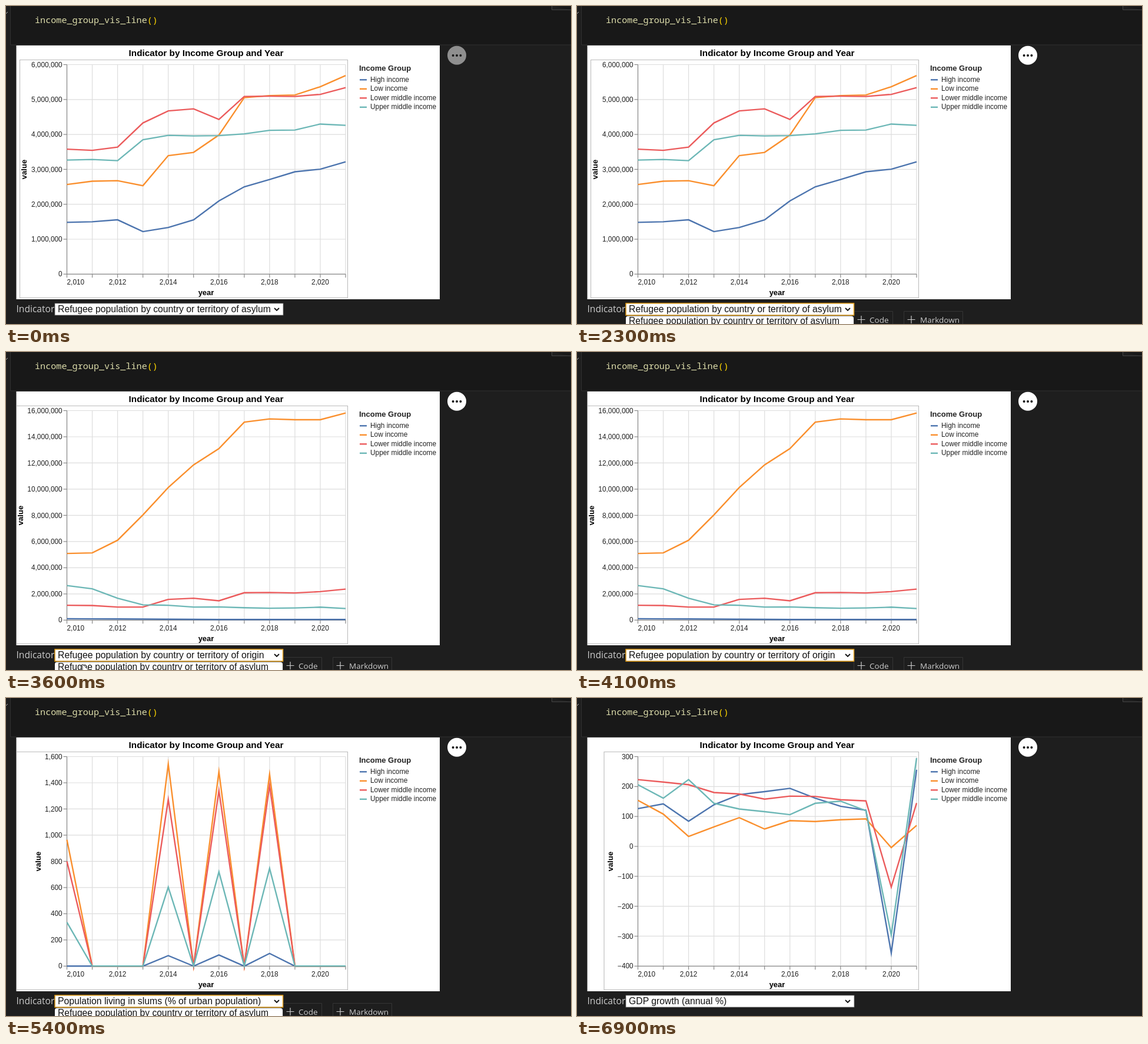
Write an HTML page that moves like this. It is 960 by 540 pixels and loops after 7 s.

```html
<!DOCTYPE html>
<html lang="en">
<head>
<meta charset="utf-8">
<title>Income group line chart</title>
<style>
html, body { margin: 0; width: 100%; height: 100%; overflow: hidden; background: #1e1e1e; }
svg { display: block; width: 960px; height: 540px; }
text { font-family: "Liberation Sans", Arial, sans-serif; font-size: 11.86px; fill: #222; white-space: pre; }
.bold { font-weight: 700; font-size: 13px; fill: #000; }
.title { font-size: 15.33px; }
.code { font: 500 15.15px "Noto Sans Mono", "DejaVu Sans Mono", monospace; fill: #dcdcaa; }
.ui { font-family: "Open Sans", "Noto Sans", sans-serif; font-size: 13.5px; fill: #ccc; }
.label { font-size: 15.6px; }
.choice { font-size: 15.78px; fill: #111; }
.grid { stroke: #ddd; stroke-width: 1.2; }
.axis { stroke: #888; stroke-width: 1.2; }
.frame { stroke: #bbb; stroke-width: 1.1; fill: none; }
.series { fill: none; stroke-width: 2.4; stroke-miterlimit: 10; }

.step { opacity: 0; animation: 7s step-end infinite; }
#asylum { animation-name: asylum; }
#origin { animation-name: origin; }
#slums { animation-name: slums; }
#growth { animation-name: growth; }
#focus { animation-name: focus; }
#list { animation-name: list; }
#buttons { animation: buttons 7s linear infinite; }
#menu { animation: menu 7s linear infinite; }
#cursor { animation: cursor 7s linear infinite; }

@keyframes asylum { 0% { opacity: 1 } 34.28%, 100% { opacity: 0 } }
@keyframes origin { 0% { opacity: 0 } 34.28% { opacity: 1 } 59.99%, 100% { opacity: 0 } }
@keyframes slums { 0% { opacity: 0 } 59.99% { opacity: 1 } 81.42%, 100% { opacity: 0 } }
@keyframes growth { 0% { opacity: 0 } 81.42%, 100% { opacity: 1 } }
@keyframes focus { 0% { opacity: 0 } 28.56% { opacity: 1 } 98.56%, 100% { opacity: 0 } }
@keyframes list {
  0%, 34.28%, 58.56%, 79.99%, 100% { opacity: 0 }
  28.56%, 49.99%, 74.28% { opacity: 1 }
}
@keyframes buttons { 0%, 7.14% { opacity: 0 } 11.42%, 79.9% { opacity: 1 } 84%, 100% { opacity: 0 } }
@keyframes menu { 0% { opacity: .5 } 2.85%, 100% { opacity: 1 } }
@keyframes cursor {
  0%, 20.8% { transform: translate(125px, 545px) }
  21.42% { transform: translate(125px, 531px) }
  22.85%, 24.5% { transform: translate(125px, 528px) }
  27.14%, 28.57% { transform: translate(130px, 515px) }
  31.4%, 45% { transform: translate(129px, 545px) }
  45.71% { transform: translate(129px, 533px) }
  48.57%, 50% { transform: translate(130px, 516px) }
  53%, 69.3% { transform: translate(130px, 545px) }
  70% { transform: translate(130px, 531px) }
  72.86%, 74.3% { transform: translate(130px, 516px) }
  77.1%, 100% { transform: translate(130px, 545px) }
}
</style>
</head>
<body>
<svg viewBox="0 0 960 540">
  <path d="M7.5 0H960V66H7.5Z" fill="#181818"/>
  <path d="M7.5 0V66H960" fill="none" stroke="#303030"/>
  <path d="M0 13L3 10" stroke="#aaa" fill="none"/>
  <path d="M927.5 0V6.5H960" fill="#1f1f1f" stroke="#444"/>
  <text class="code" x="49" y="29">income_group_vis_line<tspan fill="#ffd700">()</tspan></text>

  <rect x="17.5" y="67" width="719.5" height="431" fill="#fff"/>
  <text class="bold title" x="340" y="85" text-anchor="middle">Indicator by Income Group and Year</text>
  <g id="legend"><text class="bold" x="600" y="109.5" style="fill:#222">Income Group</text></g>

  <g id="menu">
    <circle cx="766" cy="83.7" r="16" fill="#fff"/>
    <g fill="#111"><circle cx="759.6" cy="84" r="2"/><circle cx="766" cy="84" r="2"/><circle cx="772.4" cy="84" r="2"/></g>
  </g>

  <g id="buttons">
    <path d="M470.500 540V518.500H536.500V540M555.500 540V518.500H655.500V540" fill="none" stroke="#353535"/>
    <path d="M476.500 532.500H489.500M483 526V539M561.500 532.500H574.500M568 526V539" stroke="#ccc" stroke-width="1.2"/>
    <text class="ui" x="497" y="538">Code</text>
    <text class="ui" x="583" y="538">Markdown</text>
  </g>

  <text class="ui label" x="17.5" y="520">Indicator</text>
  <rect x="83" y="505" width="388" height="20" fill="#fff" stroke="#767676" stroke-width=".8"/>
  <rect id="focus" class="step" x="83" y="504.700" width="387.500" height="20.500" fill="none" stroke="#e59700" stroke-width="1.3"/>
  <path d="M456 513L460 517L464 513" fill="none" stroke="#111" stroke-width="1.9"/>

  <g id="charts"></g>

  <g id="list" class="step">
    <rect x="83" y="526.500" width="387" height="30" rx="4" fill="#fff"/>
    <text class="choice" x="88" y="539.500" style="font-size:15.6px">Refugee population by country or territory of asylum</text>
  </g>
  <path id="cursor" d="M0 0V16L3.700 12.500L6.200 18L8.600 17L6.200 11.600H11.400Z" fill="#fff" stroke="#111" stroke-width=".8"/>
</svg>
<script>
const NS = "http://www.w3.org/2000/svg";
const LEFT = 103.5, RIGHT = 577, TOP = 99.5, BOTTOM = 455.3, YEARS = 11;
const GROUPS = [
  ["High income", "#4c74ae"],
  ["Low income", "#fa8f2d"],
  ["Lower middle income", "#eb5b5c"],
  ["Upper middle income", "#6cb7b6"],
];

function add(parent, tag, attrs, content = "") {
  const el = document.createElementNS(NS, tag);
  for (const key in attrs) el.setAttribute(key, attrs[key]);
  el.textContent = content;
  return parent.appendChild(el);
}
const path = (parent, d, cls, stroke) =>
  add(parent, "path", stroke ? { d, class: cls, stroke } : { d, class: cls });
const label = (parent, x, y, str, anchor, cls = "") =>
  add(parent, "text", { x, y, "text-anchor": anchor, class: cls }, str);
const xAt = year => LEFT + year * (RIGHT - LEFT) / YEARS;

// Values are given in units of `scale`.
function drawChart({ id, choice, min = 0, max, tick, scale = 1, titleX, edge, series }) {
  const g = add(document.getElementById("charts"), "g", { id, class: "step" });
  const yAt = v => BOTTOM - (v - min) / (max - min) * (BOTTOM - TOP);

  path(g, `M${edge} 91.500H580.500V495.500H${edge}${edge > 18 ? "Z" : ""}`, "frame");
  for (let i = 0; i <= YEARS; i++) path(g, `M${xAt(i)} ${TOP}V${BOTTOM}`, "grid");
  for (let v = min; v <= max; v += tick) {
    const y = yAt(v);
    const str = Math.abs(v * scale).toLocaleString("en-US");
    path(g, `M${LEFT} ${y}H${RIGHT}`, "grid");
    path(g, `M${LEFT - 6} ${y}H${LEFT}`, "axis");
    label(g, 95.7, y + 4.1, (v < 0 ? "\u2212" : "") + str, "end");
  }
  path(g, `M${LEFT} ${TOP}V${BOTTOM}H${RIGHT}`, "axis").setAttribute("fill", "none");
  for (let i = 0; i <= YEARS; i++) {
    path(g, `M${xAt(i)} ${BOTTOM}v6`, "axis");
    if (i % 2 === 0) label(g, xAt(i), 473, "2,0" + (10 + i), i ? "middle" : "start");
  }
  label(g, 340, 491, "year", "middle", "bold");
  label(g, 0, 0, "value", "middle", "bold")
    .setAttribute("transform", `translate(${titleX} 277.5) rotate(-90)`);

  series.forEach((values, n) => {
    const points = values.map((v, i) => `${xAt(i)} ${yAt(v).toFixed(2)}`);
    path(g, "M" + points.join("L"), "series", GROUPS[n][1]);
  });
  label(g, 88, 520, choice, "start", "choice");
}

GROUPS.forEach(([name, color], i) => {
  const y = 125.3 + i * 15.5, legend = document.getElementById("legend");
  path(legend, `M601 ${y}h12`, "series", color);
  label(legend, 619, y + 3.3, name, "start");
});

drawChart({
  id: "asylum", choice: "Refugee population by country or territory of asylum",
  max: 6, tick: 1, scale: 1e6, titleX: 35, edge: 23.5,
  series: [
    [1.482, 1.499, 1.555, 1.218, 1.336, 1.555, 2.095, 2.5, 2.71, 2.93, 3.005, 3.216],
    [2.567, 2.66, 2.676, 2.533, 3.393, 3.486, 3.983, 5.054, 5.113, 5.13, 5.366, 5.687],
    [3.578, 3.545, 3.638, 4.329, 4.674, 4.733, 4.43, 5.088, 5.096, 5.088, 5.147, 5.341],
    [3.266, 3.283, 3.25, 3.848, 3.975, 3.958, 3.966, 4.017, 4.118, 4.126, 4.298, 4.261],
  ],
});

drawChart({
  id: "origin", choice: "Refugee population by country or territory of origin",
  max: 16, tick: 2, scale: 1e6, titleX: 29, edge: 17.5,
  series: [
    Array.from({ length: 12 }, (_, i) => Math.max(.05, .11 - i * .01)),
    [5.09, 5.135, 6.1, 8.035, 10.126, 11.857, 13.094, 15.117, 15.364, 15.306, 15.306, 15.814],
    [1.133, 1.115, .998, .998, 1.583, 1.673, 1.479, 2.091, 2.109, 2.077, 2.176, 2.37],
    [2.64, 2.39, 1.673, 1.165, 1.133, .998, 1.007, .944, .908, .931, .989, .886],
  ],
});

// Surveyed years only; every other year is zero.
const surveys = (first, a, b, c) => [first, 0, 0, 0, a, 0, b, 0, c, 0, 0, 0];
drawChart({
  id: "slums", choice: "Population living in slums (% of urban population)",
  max: 1600, tick: 200, titleX: 59, edge: 17.5,
  series: [
    surveys(0, 80, 85, 97),
    surveys(965, 1543, 1485, 1465),
    surveys(800, 1273, 1341, 1380),
    surveys(335, 603, 720, 747),
  ],
});

drawChart({
  id: "growth", choice: "GDP growth (annual %)",
  min: -400, max: 300, tick: 100, titleX: 61, edge: 46,
  series: [
    [126, 142, 84, 139, 173, 183, 194, 161, 134, 121, -356, 256],
    [154, 108, 33, 65, 96, 58, 86, 83, 89, 92, -4, 70],
    [223, 215, 206, 180, 175, 158, 168, 167, 156, 152, -136, 145],
    [206, 161, 223, 144, 125, 116, 106, 144, 151, 119, -296, 295],
  ],
});
</script>
</body>
</html>
```
